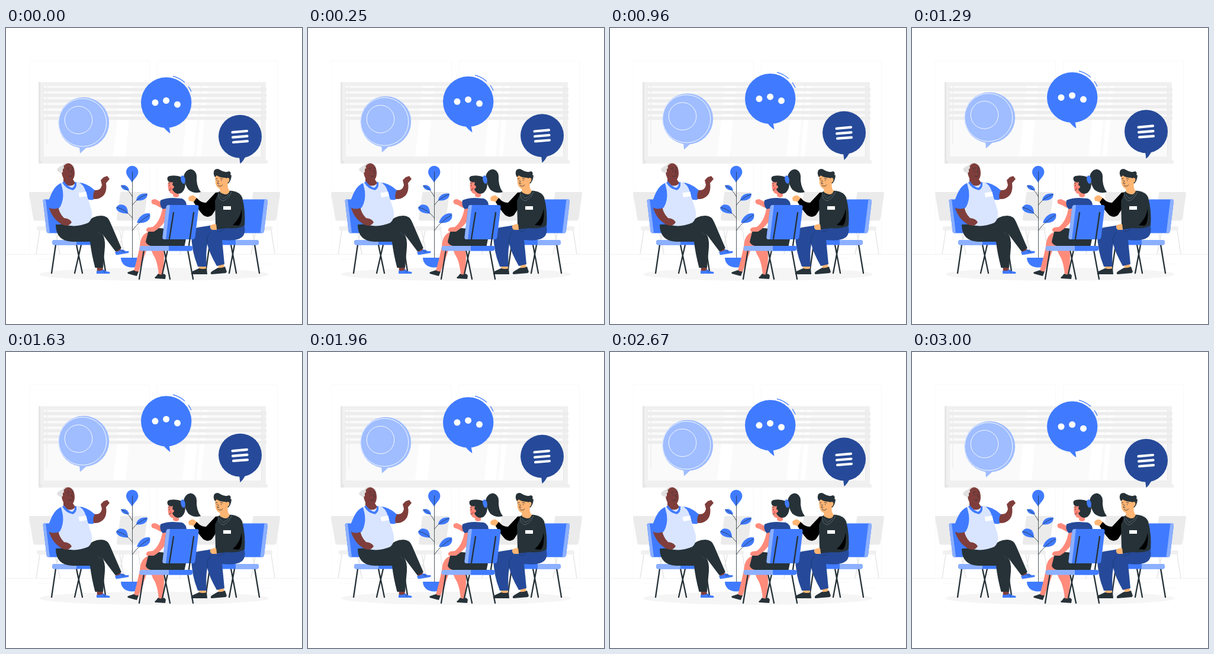
Recreate the animation shown at these times as an HTML page. Size 500 px wide and 500 px high, loop 3.04 s.

```html
<!DOCTYPE html>
<html lang="en">
<head>
<meta charset="utf-8">
<title>Group conversation</title>
<style>
  html, body { margin: 0; width: 100%; height: 100%; overflow: hidden; background: #fff; }
  svg { display: block; width: 100vw; height: 100vh; }
  .blue { fill: #407bff; }
  .pale { fill: #8cb0ff; }
  .navy { fill: #264a99; }
  .dark { fill: #263238; }
  .brown { fill: #7f3e3b; }
  .pink { fill: #ff8b7b; }
  .tan { fill: #ffb573; }
  .white { fill: #fff; }
  .line { fill: none; stroke: #263238; stroke-linecap: round; stroke-linejoin: round; }
  .leg { stroke-width: 2.3; }
  .thin { stroke-width: .8; }
</style>
</head>
<body>
<svg viewBox="0 0 500 500">
  <!-- Room -->
  <g fill="none" stroke="#f9f9f9">
    <path d="M39.500 382V55.500H242.500V382M255.500 382V55.500H458.500V382"/>
    <path stroke="#ebebeb" stroke-width=".7" d="M0 382.400H500"/>
    <path stroke="#f5f5f5" stroke-width=".7" d="M428 398.500H448M52 390.500H78M390 389H404"/>
  </g>

  <!-- Window -->
  <path fill="#f0f0f0" d="M55 91.500H439V229H55Z"/>
  <path fill="#fafafa" d="M64 98H432V217H64Z"/>
  <path class="white" d="M194 98H213L202 217H181ZM310 98H328L317 217H298ZM332 98H341L329 217H322Z"/>
  <path fill="#e6e6e6" d="M55 91.500H58V224H61V229H55Z"/>
  <path fill="#f0f0f0" d="M61 223.500H442V229H61Z"/>
  <path fill="none" stroke="#e2e2e2" stroke-width=".8" d="M431.500 98V217M69 98V196"/>
  <g id="blinds" fill="#ededed"></g>

  <!-- Distant chairs -->
  <g id="farChairs"></g>

  <ellipse cx="250" cy="416" rx="194" ry="11" fill="#f5f5f5"/>

  <!-- Plant -->
  <g class="blue">
    <path d="M213 261C209 254 203 250 203 243A10.200 10.200 0 0 1 223.400 243C223.400 250 217 254 213 261Z"/>
    <path d="M194 266C200 264 206 266 208 274C201 275 195 272 194 266Z"/>
    <path d="M220 291C221 283 229 278 239 280C239 289 230 293 220 291Z"/>
    <path d="M206 313.500C196 314 187 310 186 304C189 297 197 297 202 301C205 304 206 309 206 313.500Z"/>
    <path d="M221 329C224 319 233 311 243 313.500C246 325 235 331 221 329Z"/>
    <path d="M194 388H232.500C232 398 224 404.500 213 404.500S194 398 194 388Z"/>
  </g>
  <path class="line thin" d="M213.500 243V388M213.500 285Q207 272 195 266M213.500 299Q222 287 238 281M213.500 321Q202 306 187 303M213.500 342Q224 327 242 316"/>

  <!-- Left seat -->
  <path class="line leg" d="M84 366L77 414M119 366L129 414M127 366L116 414M161 366L168 411"/>
  <path class="blue" d="M65 289.500H104L111 346.500H72Q69 346.500 68.500 343L62.500 292Q62.500 289.500 65 289.500Z"/>
  <path class="pale" d="M65 289.500H67L74 346.500H72Q69 346.500 68.500 343L62.500 292Q62.500 289.500 65 289.500Z"/>
  <rect class="blue" x="78" y="358" width="68" height="8.500" rx="4"/>
  <path class="pale" d="M82 358H119V366.500H82Q78 366 78 362T82 358Z"/>

  <!-- Man on the left -->
  <g>
    <path class="brown" d="M182 370L191 367L195 377L187 380ZM153 398H163L164 411H154Z"/>
    <path class="blue" d="M184 378Q190 378 195 374L199 375Q201 378 207 376.500Q208 379 207 380L186 383.500ZM153 410Q160 411 165 408L169 411L175 412Q176 414 175 415H153Z"/>
    <path class="line" stroke-width=".7" d="M195 376L198 379M198 375.500L200 378M165 410L167 413"/>
    <path class="dark" d="M84 332L134 330Q146 317 161 317Q172 317 176 328L195 372L185 377.500L162 347Q168 354 167 370L164 405H150.500Q144 380 142 361H112Q84 360 84 332Z"/>
    <path fill="none" stroke="#455a64" stroke-width=".6" d="M155 345Q159 347 160 350"/>
    <path class="brown" d="M145 273Q160 277 162 265L160 257L165 252L171 250L175 255L169 262Q172 282 157 288Q151 290 144 288Z"/>
    <path class="blue" d="M121 261Q136 261 150 274Q146 281 148 290Q137 292 131 284Z"/>
    <path fill="#d9e5ff" d="M92 262Q105 257 121 260Q131 263 135 277L144 306Q148 321 139 329Q118 338 99 332Q86 329 84 318L91 300Z"/>
    <path class="brown" d="M97 249L112 254L117 262Q109 271 97 262Z"/>
    <path class="blue" d="M95 261L98 259Q104 268 112 270Q117 267 116 260L119 261Q120 271 113 274Q101 272 95 261Z"/>
    <path class="brown" d="M72 301L88 300Q89 312 98 321Q108 322 111 328Q108 333 103 334L97 333Q78 324 72 301Z"/>
    <path class="blue" d="M93 262Q82 266 75 284Q69 297 72 303Q80 308 91 303Q98 291 96 275Z"/>
    <path class="white" d="M122.500 278.500L135.500 276.500L137 284L124 286Z"/>
    <path class="brown" d="M93 240C94 231 99 228 106 228.500C113 230 116 237 116 245C116 253 113 257.500 108 258.500C102 261 97 256 95 249Z"/>
    <path fill="#e0e0e0" d="M91 234Q96 231 98 235L97 243Q93 246 89 243Q85 241 87 237ZM94 233Q98 228 105 228.500Q98 230 97 235ZM111 230Q115 231 115.500 236L113.500 234Z"/>
    <path class="brown" d="M96 238Q100 236 102 242Q100 247 96 245Z"/>
    <path class="line" stroke-width=".8" d="M103 238L107 236M111 236L114 237M106 241V242M112 240V241M110 241L112.500 246M106 250Q110 252 112 249"/>
  </g>

  <!-- Right seat -->
  <path class="line leg" d="M420 366L428 414M380 366L389 414M386 366L377 414M344 366L337 414"/>
  <path class="blue" d="M400 289.500H439Q442.500 289.500 442 293L436 343Q435.500 346.500 432 346.500H393Z"/>
  <path class="pale" d="M436.500 289.500H439Q442.500 289.500 442 293L436 343Q435.500 346.500 432 346.500H429.500Z"/>
  <rect class="blue" x="359" y="358" width="68" height="8.500" rx="4"/>
  <path class="pale" d="M388 358H423Q427 358 427 362T423 366.500H388Z"/>

  <!-- Man on the right -->
  <g>
    <path class="tan" d="M326 397H338V410H326ZM357 395L367 393L369 408L360 409Z"/>
    <path class="dark" d="M326 406Q333 408 339 406L340 416H313Q312 413 315 411ZM358 405Q364 406 370 403L373 412L371 414L347 416Q344 414 348 411Z"/>
    <path class="navy" d="M355 332L403 335Q405 347 399 353Q389 361 365 358Q367 378 369 399L356 402Q343 379 340 365Q337 380 339 403L324 403Q313 376 313 347Q313 339 324 337Z"/>
    <path fill="none" stroke="#1c3772" stroke-width=".8" d="M340 364Q338 351 346 344M369 338Q366 345 357 344"/>
    <path class="tan" d="M308 287Q312 282 317 283L326 290L324 298L315 293L309 292Z"/>
    <path d="M322 287Q330 296 338 295L354 278L362 277Q360 300 348 316Q341 322 333 316Q323 305 317 294Z"/>
    <path class="dark" d="M360 276Q371 274 382 275Q395 277 399 286Q405 310 403 334Q383 343 354 334L353 292Z"/>
    <path class="tan" d="M345 334Q350 330 357 332L356 341H348Q344 339 345 334Z"/>
    <path class="dark" d="M386 286Q397 283 400 294Q404 311 399 325Q393 337 356 340L355 331L379 325Q387 311 386 286Z"/>
    <path d="M398 305Q396 321 383 333L393 334Q400 328 398 305Z"/>
    <path class="tan" d="M362 266L375 260Q373 271 378 275Q374 286 361 277Z"/>
    <path fill="none" stroke="#65737a" stroke-width=".8" d="M358 278Q359 291 367 292Q377 288 381 276M361 281Q365 286 367 288Q373 285 377 280"/>
    <path class="white" d="M367 301H380V307H367Z"/>
    <path class="tan" d="M353 249Q361 244 371 247Q378 250 375 259Q374 270 365 273Q356 271 354 263Z"/>
    <path class="dark" d="M353 252Q349 246 352 240Q357 236 362 240Q370 245 377 242Q381 244 379 248L381 249Q380 259 375 263L371 253Q361 253 356 249Z"/>
    <path class="tan" d="M370 256Q373 251 377 254Q379 259 373 262Z"/>
    <path class="line" stroke-width=".8" d="M354 255L357 254M362 254L366 255M356.500 257V258M363.500 257V258M359 258L357 263L360 263M358 266Q363 269 366 265"/>
  </g>

  <!-- Woman -->
  <g>
    <path class="pink" d="M247 290L252 289L258 292L266 297L262 304L253 299L247 297Q244 293 247 290Z"/>
    <path class="pink" d="M239 345L247 342L256 347L238 374L223 414L215 413Q221 393 226 369Q227 350 239 345Z"/>
    <path class="pink" d="M241 360L262 363Q268 375 267 391L265 418H258Q257 401 252 389Q244 376 241 360Z"/>
    <path class="dark" d="M216 409Q220 412 224 411L221 419L217 418L206 415Q204 413 207 412ZM257 415Q262 418 267 415L270 418L269 424L252 423Q250 421 253 420Z"/>
    <path class="dark" d="M241 341Q254 336 268 339L306 347L301 371L264 371Q238 370 236 361Z"/>
    <path class="navy" d="M261 291Q270 287 282 287L297 288Q306 291 305 304L300 341L268 341L270 310Q258 303 261 291Z"/>
    <path class="pink" d="M264 306L275 304L270 324Q263 336 250 344L238 344Q235 340 240 337L248 336Q260 327 264 306Z"/>
    <path class="pink" d="M283 277L292 276L292 284Q288 288 282 284Z"/>
    <path class="pink" d="M276 255Q285 252 291 260L289 279Q282 283 277 278Q273 272 273.500 264Z"/>
    <path class="dark" d="M274 259Q270 252 276 250Q288 248 297 252Q305 259 302 270Q299 280 290 280Q283 279 280 270L282 260Q279 262 274 259Z"/>
    <path class="pink" d="M279 266Q283 264 284 269Q282 273 279 271Z"/>
    <path class="line" stroke-width=".8" d="M274 262L277 262M276 265V267M275 274L278 273"/>
    <ellipse fill="#ed3442" cx="278" cy="270.500" rx="2" ry="1.500" opacity=".45"/>
    <path class="dark" d="M300 251Q302 240 312 238.500Q321 240 322 250Q321 267 329 277Q318 281 308 273Q302 265 300 251Z"/>
    <path class="line thin" d="M321 274Q325 277 328 277"/>
    <ellipse class="blue" cx="299" cy="256" rx="3.700" ry="7" transform="rotate(-12 299 256)"/>
  </g>

  <!-- Front chair -->
  <path class="line leg" d="M233 375L225 424M267 375L277 424M273 375L264 416M307 375L316 424"/>
  <path class="blue" d="M275 299H322Q326 299 325.500 303L319.500 353Q319 357 315 357H268Q264 357 264.500 353L270.500 303Q271 299 275 299Z"/>
  <path class="pale" d="M275 299H277L270 357H268Q264 357 264.500 353L270.500 303Q271 299 275 299Z"/>
  <path class="line leg" stroke-linecap="butt" d="M283 312L276 356M317 312L309 367"/>
  <rect class="pale" x="225.500" y="368" width="90" height="8.500" rx="4"/>
  <path class="blue" d="M275 368H311Q315.500 368 315.500 372T311 376.500H275Z"/>

  <!-- Speech bubbles -->
  <g id="bubbles">
    <g fill="#9fbdff">
      <circle cx="131.200" cy="160" r="43"/>
      <path d="M124 200L125 212L137 201Z"/>
      <g fill="none" stroke="#fff" stroke-width=".9">
        <circle cx="129.300" cy="159.700" r="40.500"/>
        <circle cx="122.500" cy="155.500" r="23.300"/>
      </g>
    </g>
    <g class="blue">
      <circle cx="270.700" cy="126" r="42.700"/>
      <path d="M265 166Q271 174 277.500 178L275 164Z"/>
      <path fill="none" stroke="#407bff" stroke-width="1.200" d="M282 81.300A46.500 46.500 0 0 1 302 92M308 98.600A46.500 46.500 0 0 1 313 107.500"/>
      <g class="white">
        <circle cx="252" cy="126" r="5.500"/>
        <circle cx="270.600" cy="122.600" r="5.500"/>
        <circle cx="289.500" cy="129.200" r="5.500"/>
      </g>
    </g>
    <g class="navy">
      <circle cx="395.500" cy="183.300" r="36.500"/>
      <path d="M394 218L395.500 229.300Q401 225 405 216Z"/>
      <path stroke="#fff" stroke-width="4.200" stroke-linecap="round" d="M382.500 176.200L407 174M383 184.700L407.500 182.700M384 193L408 191.200"/>
    </g>
  </g>
</svg>
<script>
  const byId = id => document.getElementById(id);

  byId('blinds').innerHTML = Array.from({ length: 6 }, (_, i) =>
    `<rect x="62" y="${101.2 + i * 9.7}" width="378" height="5.5" rx="1"/>`).join('');

  // Each distant chair: left edge of the backrest and its lean.
  const farChair = (x, lean) => {
    const foot = x + lean;
    const seat = lean > 0 ? x : x - 45;
    const legs = [[18, 12], [44, 52], [50, 42], [76, 82]]
      .map(([top, bottom]) => `M${seat + top} 342L${seat + bottom} 382`).join('');
    return `<path fill="#ebebeb" d="M${x + 2} 277H${x + 44}Q${x + 46} 277 ${x + 46} 280L${foot + 46} 322
      Q${foot + 45} 325.500 ${foot + 42} 325.500H${foot + 3}Q${foot} 325.500 ${foot} 322L${x} 280Q${x} 277 ${x + 2} 277Z"/>
      <rect x="${seat + (lean > 0 ? 13 : 23)}" y="335" width="55" height="7" rx="3" fill="#f0f0f0"/>
      <path fill="none" stroke="#e6e6e6" stroke-width="1.500" d="${legs}"/>`;
  };
  byId('farChairs').innerHTML =
    [[39, 7], [193, -6], [327, -6], [417, -6]].map(c => farChair(...c)).join('');

  const LOOP = 3040, FLOAT = 3000, RISE = 10;
  const bubbles = byId('bubbles');

  function draw(now) {
    const phase = Math.min(now % LOOP, FLOAT) / FLOAT;
    const lift = RISE * (1 - Math.abs(1 - 2 * phase));
    bubbles.setAttribute('transform', `translate(0 ${-lift})`);
  }

  const start = performance.now();
  function tick() {
    draw(performance.now() - start);
    requestAnimationFrame(tick);
  }
  tick();
</script>
</body>
</html>
```
